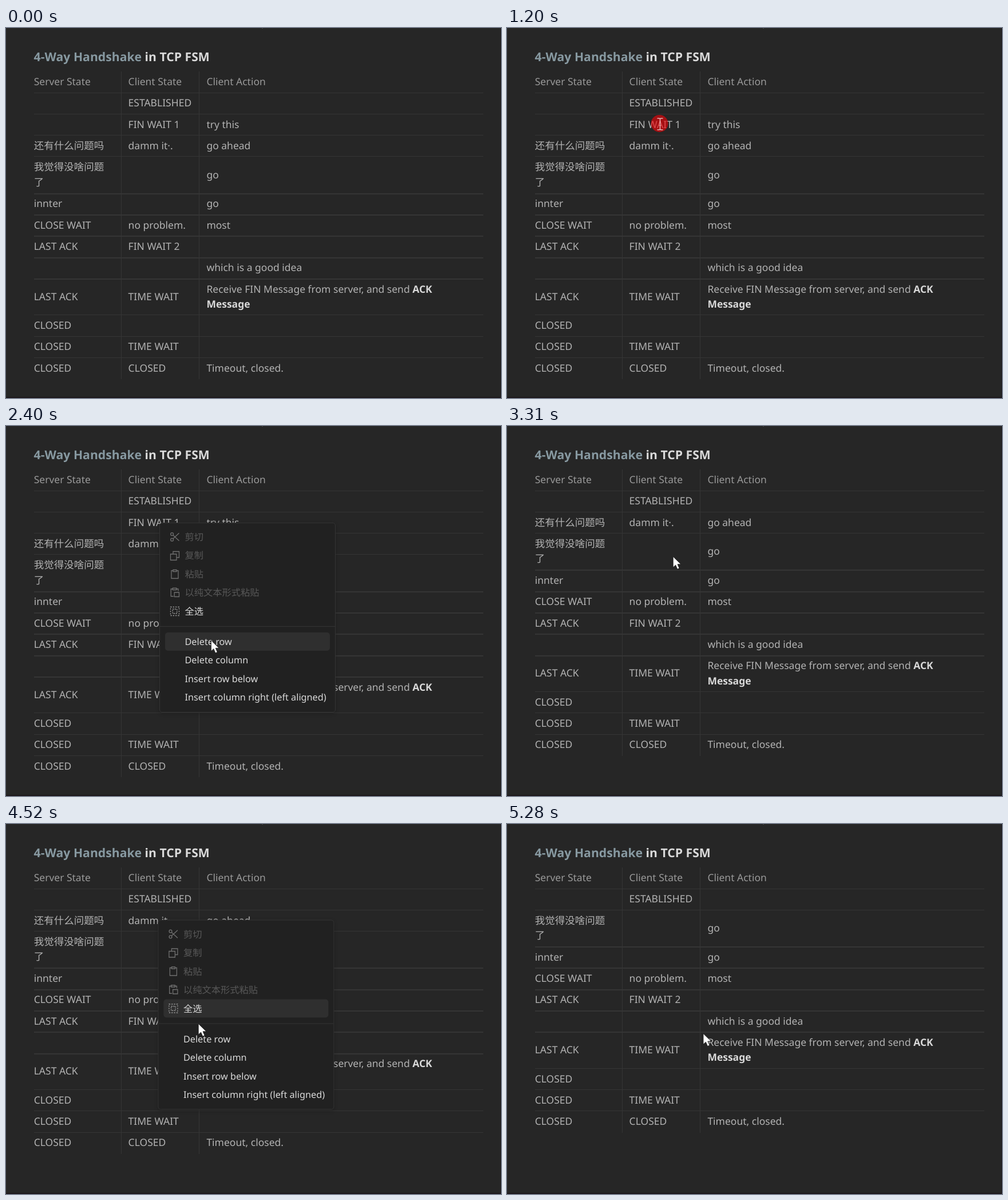
Recreate the animation shown at these times as an HTML page. Size 865x647 px, loop 5480 ms.

```html
<!DOCTYPE html>
<html lang="zh-CN">
<head>
<meta charset="utf-8">
<title>Table row menu</title>
<style>
html, body { margin: 0; width: 100%; height: 100%; overflow: hidden; background: #262626; }
body { font: 17.5px/26.25px "Noto Sans", "Noto Sans CJK SC", "Noto Sans CJK", sans-serif; color: #b3b3b3; text-rendering: geometricPrecision; }
#stage { position: absolute; left: 0; top: 0; width: 865px; height: 647px; overflow: hidden; background: #262626; }
#edge { position: absolute; inset: 0; border: solid #1c171b; border-width: 0 1px 2px 0; }
#speck { position: absolute; left: 447px; top: 0; width: 2px; height: 1px; background: #4a4a4a; }
h1 { position: absolute; left: 48.6px; top: 35.4px; margin: 0; font-size: 21.18px; line-height: 31px; font-weight: 700; color: #dadada; white-space: nowrap; }
h1 span { color: #8799a1; }
#table { position: absolute; left: 48.7px; top: 76.3px; width: 785.3px; }
.row { display: grid; grid-template-columns: 152.9px 136.8px 1fr; height: 37.3px; box-sizing: border-box; border-bottom: 1px solid #353535; }
.row.tall { height: 63.5px; }
.row.cjk { height: 64.3px; }
.row.thick { box-shadow: 0 1px #353535; }
.row:first-child { color: #999; }
.row:last-child { border-color: transparent; }
.row > div { display: flex; align-items: center; white-space: nowrap; margin-bottom: -1px; padding-bottom: 1.8px; }
.row > div + div { padding-left: 12px; }
.row > div:not(:last-child) { border-right: 1px solid #353535; }
.row b { color: #d8d8d8; }
#menu { position: absolute; left: 0; top: 0; width: 308px; height: 332px; box-sizing: border-box; padding: 8px 9px;
  background: #212121; border: 1px solid #343434; border-radius: 5px; box-shadow: 0 2px 6px rgba(0,0,0,.22);
  font-size: 16.25px; line-height: 32.4px; color: #dadada; }
.item { position: relative; height: 32.4px; padding-left: 34.5px; border-radius: 5px; white-space: nowrap; }
.item.off { color: #585858; }
.item.on { background: #2f2f2f; }
.item svg { position: absolute; left: 7.5px; top: 7.2px; width: 18px; height: 18px; fill: none; stroke: #9a9a9a; stroke-width: 1.7; }
.item.off svg { stroke: #707070; }
.sep { height: 1px; margin: 10px -9px; background: #343434; }
#pointer { position: absolute; left: 0; top: 0; width: 1px; height: 1px; overflow: visible; }
</style>
</head>
<body>
<div id="stage">
  <div id="edge"></div>
  <div id="speck"></div>
  <h1><span>4-Way Handshake</span> in TCP FSM</h1>
  <div id="table"></div>
  <div id="menu"></div>
  <svg id="pointer">
    <circle id="click" cx="-1" cy="-1" r="15" fill="#fa0206" fill-opacity=".6"/>
    <path id="arrow" d="M0 0V18.8L4.4 14.8L7.5 22L10.9 20.5L7.9 13.5H13.8Z" fill="#fff" stroke="#161616" stroke-width=".8"/>
    <path id="beam" d="M-5 -10H-2Q0 -10 0 -8.5Q0 -10 2 -10H5M0 -8.5V8.5M-5 10H-2Q0 10 0 8.5Q0 10 2 10H5" fill="none" stroke="#fff" stroke-opacity=".7" stroke-width="1.5"/>
  </svg>
</div>
<script>
const LOOP = 5480;
const $ = id => document.getElementById(id);

// Cells of each row, then extra classes
const rows = [
  ["Server State", "Client State", "Client Action"],
  ["", "ESTABLISHED", ""],
  ["", "FIN WAIT 1", "try this"],
  ["还有什么问题吗", "damm it·.", "go ahead"],
  ["我觉得没啥问题<br>了", "", "go", "cjk thick"],
  ["innter", "", "go", "thick"],
  ["CLOSE WAIT", "no problem.", "most", "thick"],
  ["LAST ACK", "FIN WAIT 2", "", "thick"],
  ["", "", "which is a good idea", "thick"],
  ["LAST ACK", "TIME WAIT", "Receive FIN Message from server, and send <b>ACK</b><br><b>Message</b>", "tall"],
  ["CLOSED", "", ""],
  ["CLOSED", "TIME WAIT", ""],
  ["CLOSED", "CLOSED", "Timeout, closed."]
];
$("table").innerHTML = rows.map(([a, b, c, cls = ""]) =>
  `<div class="row ${cls}">` + [a, b, c].map(s => `<div><span>${s}</span></div>`).join("") + "</div>").join("");

const icon = body => `<svg viewBox="0 0 24 24">${body}</svg>`;
const board = '<path d="M8 4H4V22H20V4H16"/><path d="M8 2H16V6H8Z"/>';
const icons = {
  cut: icon('<circle cx="5.5" cy="5.5" r="3.2"/><circle cx="5.5" cy="18.5" r="3.2"/><path d="M8 16L22 3M8 8L22 21"/>'),
  copy: icon('<path d="M8 8V2H22V16H16"/><path d="M2 8H16V22H2Z"/>'),
  paste: icon(board),
  plain: icon('<path d="M8 4H3V21H9M15 4H20V9"/><path d="M7 2H16V6H7ZM11 12H22V22H11Z"/>'),
  all: icon('<path d="M2 2H22V22H2Z" stroke-dasharray="3 2.7"/><path d="M7 7H17V17H7Z" stroke-dasharray="3 2"/>')
};
const item = (text, cls, pic = "") => `<div class="item ${cls}">${pic}${text}</div>`;
$("menu").innerHTML =
  item("剪切", "off", icons.cut) + item("复制", "off", icons.copy) +
  item("粘贴", "off", icons.paste) + item("以纯文本形式粘贴", "off", icons.plain) +
  item("全选", "all", icons.all) + '<div class="sep"></div>' +
  item("Delete row", "del") + item("Delete column", "") +
  item("Insert row below", "") + item("Insert column right (left aligned)", "");

// Pointer moves: start, end, steps, from x y, to x y, ease-out power
const moves = [
  [130, 660, 9, 720, 602, 286, 191, 1.7],
  [740, 1050, 5, 283, 187, 267.5, 168, 1.5],
  [1720, 2260, 9, 278, 188, 355.5, 355, 1.8],
  [2330, 2530, 4, 355.5, 364, 359, 377, 4.5],
  [2880, 2880, 1, 353, 367, 353, 367, 1],
  [3170, 3590, 7, 334.5, 337, 265, 166.5, 2.5],
  [4180, 4720, 9, 275, 190, 343, 367, 2.35],
  [4790, 4790, 1, 343, 366.5, 343, 366.5, 1]
];
const menus = [
  { open: 1330, close: 2810, x: 268, y: 169 },
  { open: 3920, close: 5210, x: 265.4, y: 167.5 }
];
const clicks = [[1200, 1330], [2680, 2880], [3790, 3920], [5140, 5280]];

function pointerAt(t) {
  const m = moves.filter(v => t >= v[0]).pop();
  if (!m) return null;
  const [start, end, steps, x0, y0, x1, y1, power] = m;
  const gap = (end - start) / (steps - 1);
  const i = steps > 1 ? Math.min(steps - 1, Math.floor((t - start + 4) / gap)) : 1;
  const u = steps > 1 ? i / (steps - 1) : 1;
  const e = 1 - (1 - u) ** power;
  return { x: x0 + (x1 - x0) * e, y: y0 + (y1 - y0) * e };
}

const show = (el, on) => { el.style.display = on ? "" : "none"; };
const rowEls = $("table").children;
const allItem = document.querySelector(".all");
const delItem = document.querySelector(".del");

function draw(t) {
  const p = pointerAt(t);
  const menu = menus.find(m => t >= m.open && t < m.close);

  show(rowEls[2], t < menus[0].close);
  show(rowEls[3], t < menus[1].close);

  show($("menu"), menu);
  if (menu) {
    $("menu").style.transform = `translate(${menu.x}px, ${menu.y}px)`;
    const dy = p.y - menu.y;
    allItem.classList.toggle("on", dy >= 139 && dy < 192);
    delItem.classList.toggle("on", dy >= 192);
  }

  show($("pointer"), p);
  if (p) {
    const beam = p.y < 181;
    $("pointer").style.transform = `translate(${p.x}px, ${p.y}px)`;
    show($("beam"), beam);
    show($("arrow"), !beam);
    show($("click"), clicks.some(([a, b]) => t >= a && t < b));
  }
}

const begin = performance.now();
function tick() {
  draw((performance.now() - begin) % LOOP);
  requestAnimationFrame(tick);
}
tick();
</script>
</body>
</html>
```
